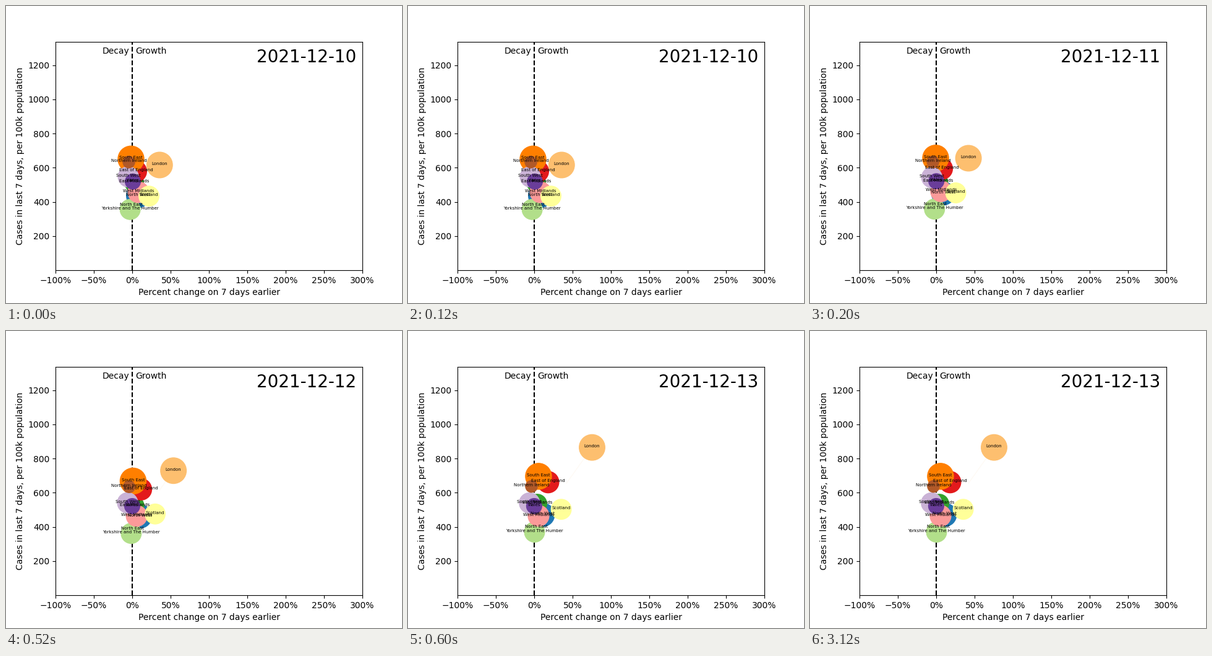
A matplotlib script for the animation above (4800 ms loop, 640 by 480 pixels).

```python
import matplotlib.pyplot as plt
from matplotlib.animation import FuncAnimation

plt.rcParams["font.family"] = "DejaVu Sans"

# name, population in ten thousands, first and last (growth %, case rate),
# pace: each daily step is this many times the step before
REGIONS = [
    ("North East", 267, (-1.6, 377), (2.8, 395), 1.9),
    ("North West", 734, (7.7, 435), (11.2, 471), 0.8),
    ("Yorkshire and The Humber", 550, (-2.7, 356), (0.4, 370), 1.9),
    ("East Midlands", 484, (2.4, 514), (4.0, 536), 2.2),
    ("West Midlands", 593, (8.1, 457), (5.6, 465), 0.3),
    ("East of England", 624, (4.8, 579), (18.1, 662), 1.65),
    ("London", 896, (35.7, 616), (75.4, 865), 1.85),
    ("South East", 918, (-1.6, 651), (5.6, 696), 2.3),
    ("South West", 562, (-5.1, 547), (-6.2, 540), 0.5),
    ("Wales", 315, (0.8, 519), (-0.1, 522), 0.3),
    ("Scotland", 546, (21.8, 434), (35.2, 503), 1.2),
    ("Northern Ireland", 189, (-4.4, 633), (-3.6, 637), 1.8),
]
DAYS = 4
FIRST_DAY = 10
STEPS = 24      # the last day is held until the loop ends
STEP_MS = 200


def progress(day, pace):
    """Share of the whole move done by the given day."""
    return sum(pace ** k for k in range(day)) / sum(pace ** k for k in range(DAYS - 1))


def place(region, day):
    _, _, start, end, pace = region
    p = progress(day, pace)
    return tuple(a + (b - a) * p for a, b in zip(start, end))


fig, ax = plt.subplots(figsize=(6.4, 4.8), dpi=100)
ax.set_xlim(-100, 300)
ax.set_ylim(0, 1337.5)
ax.set_xticks(range(-100, 301, 50))
ax.set_yticks(range(200, 1201, 200))
ax.xaxis.set_major_formatter(lambda v, _: f"{v:.0f}%".replace("-", "\u2212"))
ax.set_xlabel("Percent change on 7 days earlier")
ax.set_ylabel("Cases in last 7 days, per 100k population")

ax.axvline(0, color="black", linestyle="--", zorder=0.5)
in_axes = ax.transAxes
ax.text(0.24, 0.9475, "Decay", ha="right", transform=in_axes)
ax.text(0.26, 0.9475, "Growth", ha="left", transform=in_axes)
date = ax.text(0.98, 0.91, "", ha="right", fontsize=20, transform=in_axes)

colors = plt.get_cmap("Paired").colors
bubbles = ax.scatter(*zip(*(r[2] for r in REGIONS)),
                     s=[r[1] for r in REGIONS], c=colors, zorder=1)
labels = [ax.text(0, 0, r[0], ha="center", fontsize=5) for r in REGIONS]
trails = [ax.plot([], [], color=c, lw=1, alpha=0.07, zorder=0.8)[0]
          for c in colors]


def update(step):
    day = min(step, DAYS - 1)
    date.set_text(f"2021-12-{FIRST_DAY + day}")
    points = [place(r, day) for r in REGIONS]
    bubbles.set_offsets(points)
    for region, label, trail, point in zip(REGIONS, labels, trails, points):
        label.set_position(point)
        recent = range(max(0, day - 2), day + 1)
        trail.set_data(*zip(*(place(region, d) for d in recent)))
    return [date, bubbles, *labels, *trails]


anim = FuncAnimation(fig, update, frames=STEPS, init_func=lambda: update(0),
                     interval=STEP_MS, repeat=True, repeat_delay=0)
plt.show()
```
